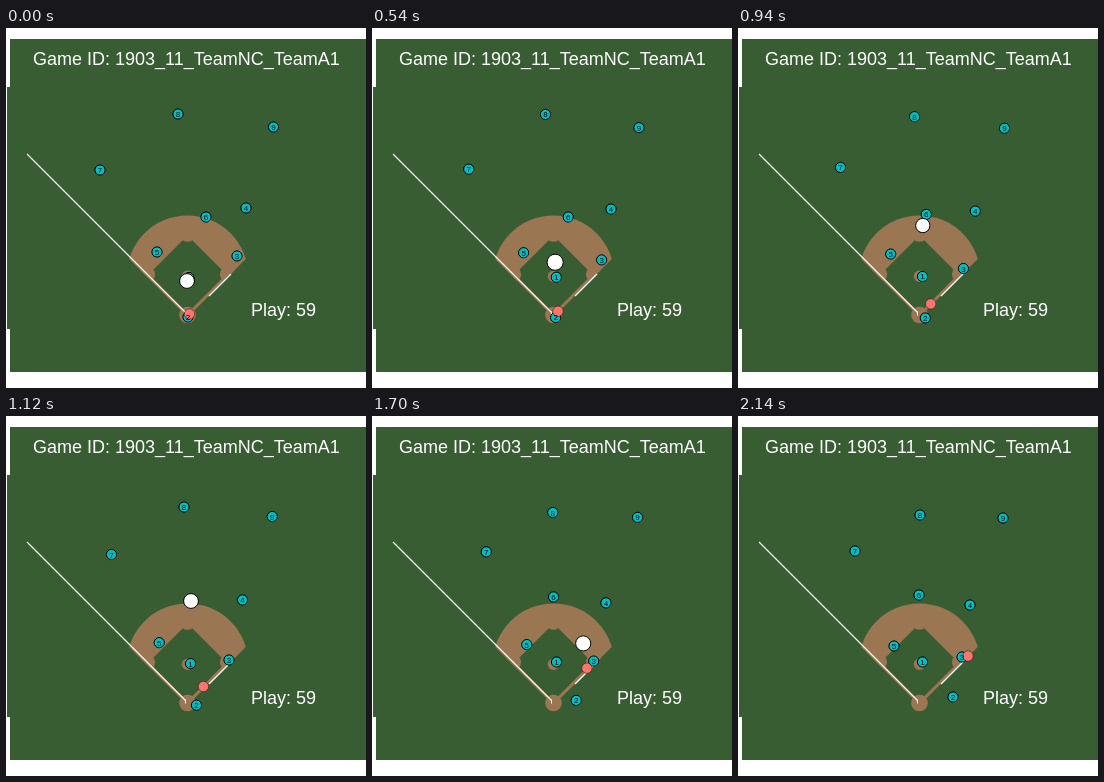
An HTML page with a canvas that plays this animation: 360x360 px, repeating every 2.16 s.

```html
<!DOCTYPE html>
<html lang="en">
<head>
<meta charset="utf-8">
<title>Play animation</title>
<style>
html, body { margin: 0; width: 100%; height: 100%; overflow: hidden; background: #fff; }
canvas { display: block; width: 360px; height: 360px; }
</style>
</head>
<body>
<canvas id="stage" width="360" height="360"></canvas>
<script>
const ctx = document.getElementById('stage').getContext('2d');
const LOOP = 2160, STEP = 20, END = 2140;
const GRASS = '#395d33', DIRT = '#9b7653', CYAN = '#00bfc4', RED = '#f8766d';
const FONT = '"Liberation Sans", Arial, sans-serif';

// Field geometry: home plate and pixels per foot
const HX = 181.5, HY = 287, FT = 0.64;
const DIAG = 90 * Math.SQRT1_2 * FT;
const MOUND = HY - 60.5 * FT;

const slope = (a, b, c) => (b[c] - a[c]) / (b[0] - a[0]);

function tangent(keys, i, c) {
  const left = i > 0 ? slope(keys[i - 1], keys[i], c) : null;
  const right = i < keys.length - 1 ? slope(keys[i], keys[i + 1], c) : null;
  if (left === null) return right;
  if (right === null) return left;
  return left * right <= 0 ? 0 : 2 * left * right / (left + right);
}

// Monotone cubic interpolation of one coordinate
function value(keys, t, c) {
  let i = 0;
  while (i < keys.length - 2 && t > keys[i + 1][0]) i++;
  const a = keys[i], b = keys[i + 1], span = b[0] - a[0];
  const u = Math.max(0, Math.min(1, (t - a[0]) / span)), v = 1 - u;
  return v * v * (1 + 2 * u) * a[c] + u * u * (3 - 2 * u) * b[c]
    + span * u * v * (v * tangent(keys, i, c) - u * tangent(keys, i + 1, c));
}

// Movers: through [ms, x, y] keys, or a straight drift with constant or eased speed
const route = (...keys) => t => [value(keys, t, 1), value(keys, t, 2)];

function drift(x, y, dx, dy, begin, eased) {
  return t => {
    const u = Math.max(0, (t - begin) / (END - begin));
    const p = eased ? u * u * (3 - 2 * u) : u;
    return [x + dx * p, y + dy * p];
  };
}

const pitcher = route([0, 183, 249.5], [760, 184.5, 249], [1400, 184.5, 246]);
const catcher = route([320, 182, 289], [920, 187, 290], [1480, 199, 286], [END, 215, 281]);
const first = route([320, 231, 228], [760, 228, 236], [1120, 223, 244], [1480, 221, 246], [1940, 223, 243], [END, 224, 241]);
const second = drift(240, 180, -8, 9, 320);
const third = drift(151, 224, 5, 6, 320);
const short = route([0, 200, 189], [320, 199, 189.5], [760, 192, 188], [1120, 185, 184.5], [1480, 182, 182], [END, 181, 179]);
const left = drift(94, 142, 23, -7, 100, true);
const center = route([320, 172, 86], [760, 175, 87], [1120, 178, 91], [1480, 180, 95], [END, 182, 99]);
const right = drift(267.5, 99, -2.5, 3, 100);
const fielders = [pitcher, catcher, first, second, third, short, left, center, right];
const runner = route([320, 183.5, 286], [760, 189, 280], [1480, 208, 259], [1940, 223, 245], [END, 230, 240]);

// Ball flight, keys are [ms, x, y, radius]
const thrown = [0, 181, 253, 7.4];
const contact = [180, 182, 285, 7.2];
const fielded = [1120, 185, 185, 7.4];
const release = [1420, 182.5, 182.5, 7.8];
const flights = [
  [thrown, contact],
  [contact, [320, 182, 262, 9.2], [760, 184.5, 211.5, 7], fielded],
  [fielded, release],
  [release, [1480, 188, 191.5, 8], [1800, 222, 244, 7.3]]
];

function disc(x, y, r, fill, line, width = 1) {
  ctx.beginPath();
  ctx.arc(x, y, r, 0, 2 * Math.PI);
  ctx.fillStyle = fill;
  ctx.fill();
  if (line) {
    ctx.strokeStyle = line;
    ctx.lineWidth = width;
    ctx.stroke();
  }
}

function trace(...points) {
  ctx.beginPath();
  points.forEach(p => ctx.lineTo(p[0], p[1]));
}

function shape(fill, ...points) {
  trace(...points);
  ctx.fillStyle = fill;
  ctx.fill();
}

function segment(from, to, width = 1) {
  trace(from, to);
  ctx.strokeStyle = '#fff';
  ctx.lineWidth = width;
  ctx.stroke();
}

// Draws inside the wedge between the two base lines
function inFair(reach, paint) {
  const tip = HY + 2.2;
  ctx.save();
  trace([HX, tip], [HX - reach, tip - reach], [HX + reach, tip - reach]);
  ctx.clip();
  paint();
  ctx.restore();
}

function label(text, x, y, size, color, align) {
  ctx.font = `${size}px ${FONT}`;
  ctx.textAlign = align;
  ctx.fillStyle = color;
  ctx.fillText(text, x, y);
}

function drawField() {
  ctx.fillStyle = '#fff';
  ctx.fillRect(0, 0, 360, 360);
  ctx.fillStyle = GRASS;
  ctx.fillRect(4, 11, 356, 333);
  ctx.fillRect(1, 59, 3, 242);

  const mid = HY - DIAG, half = DIAG - 2, cut = 13 * FT;
  inFair(120, () => {
    disc(HX, MOUND, 95 * FT, DIRT);
    shape(GRASS, [HX, mid - half], [HX + half, mid], [HX, mid + half], [HX - half, mid]);
    disc(HX - DIAG, mid, cut, DIRT);
    disc(HX, mid - DIAG, cut, DIRT);
    disc(HX + DIAG, mid, cut, DIRT);
  });
  disc(HX, HY, cut, DIRT);
  disc(HX, MOUND, 9 * FT, DIRT);

  segment([21, 126], [179.5, 284.5], 1.1);
  segment([179.5, 283.5], [179.5, 287.5]);
  segment([203, 268], [225, 246], 1.3);

  label('Game ID: 1903_11_TeamNC_TeamA1', 27, 37, 18, '#fff', 'left');
  label('Play: 59', 245, 288, 18, '#fff', 'left');
}

function draw(t) {
  drawField();
  const spots = fielders.map(place => place(t));
  spots.forEach(([x, y]) => disc(x, y, 5.1, CYAN, '#000'));
  disc(...runner(t), 5.2, RED, 'rgba(40,0,0,.6)', 0.8);
  spots.forEach(([x, y], i) => label(i + 1, x, y + 3, 8, '#000', 'center'));

  const flight = flights.find(f => t < f[f.length - 1][0]);
  if (flight) disc(...[1, 2, 3].map(c => value(flight, t, c)), '#fff', '#000');
}

const start = performance.now();
function tick() {
  const t = (performance.now() - start) % LOOP;
  draw(Math.floor(t / STEP) * STEP);
  requestAnimationFrame(tick);
}
tick();
</script>
</body>
</html>
```
